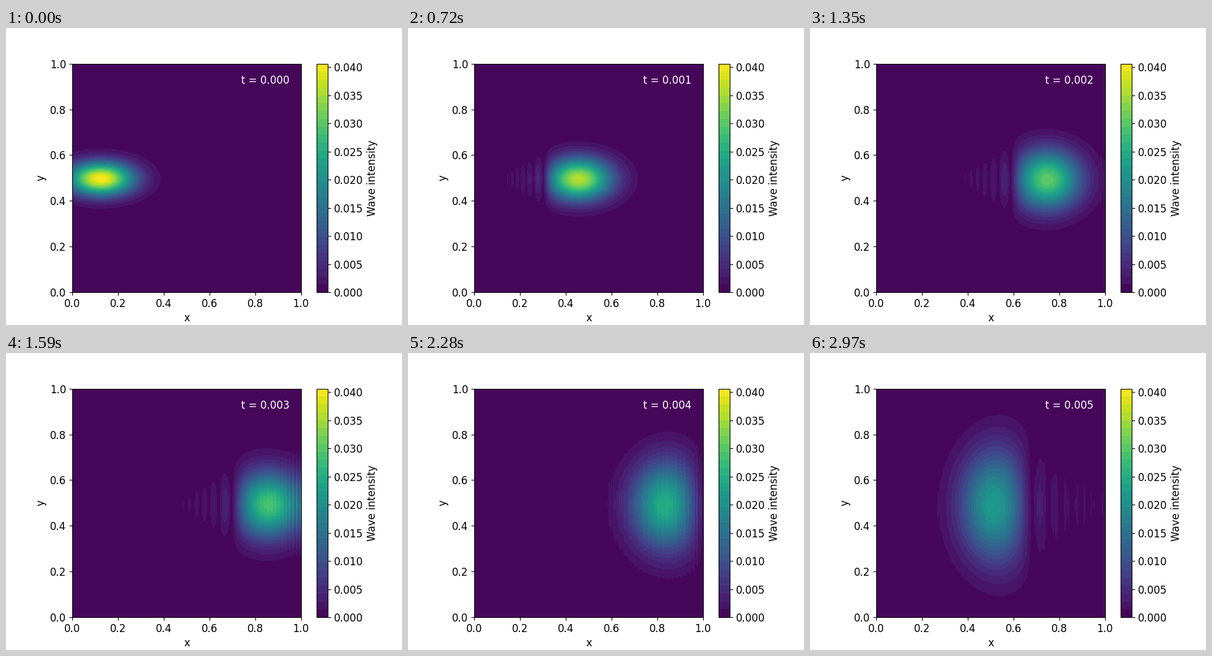
These frames come from a looping animation (640x480 px, 3 s). A matplotlib script:

```python
import numpy as np
import matplotlib.pyplot as plt
from matplotlib.animation import FuncAnimation

plt.rcParams.update({"font.family": "DejaVu Sans", "font.size": 12})

FRAMES = 100
INTERVAL = 30          # ms
FRAME_DT = 5e-5        # simulated time per frame
STEPS = 2              # Crank-Nicolson steps per frame

# Grid and initial wave packet
n = 201
x = np.linspace(0, 1, n)
dx = x[1] - x[0]
X, Y = np.meshgrid(x, x)
X0, Y0 = 0.125, 0.497
SX, SY = 0.1, 0.05
KX, KY = 200, -1

psi0 = np.exp(-0.5 * ((X - X0) / SX) ** 2 - 0.5 * ((Y - Y0) / SY) ** 2
              + 1j * (KX * X + KY * Y))
psi0 /= np.sqrt(np.sum(np.abs(psi0) ** 2))

# Sine modes diagonalise the lattice Laplacian between hard walls
m = np.arange(1, n + 1)
modes = np.sin(np.pi * np.outer(m, m) / (n + 1)) * np.sqrt(2 / (n + 1))
lam = (FRAME_DT / STEPS / dx**2) * (1 - np.cos(np.pi * m / (n + 1)))
phase = 2 * STEPS * np.arctan(lam[:, None] + lam[None, :])
coef = modes @ psi0 @ modes

top = np.abs(psi0).max()
levels = np.linspace(0, top, 30)


def amplitude(i):
    psi = modes @ (coef * np.exp(-1j * phase * i)) @ modes
    return np.minimum(np.abs(psi), top * 0.9999)


fig, ax = plt.subplots(figsize=(6.4, 4.8), dpi=100)
ax.set_aspect("equal")
ax.set_xlabel("x")
ax.set_ylabel("y")


def draw_field(i):
    return ax.contourf(x, x, amplitude(i), levels=levels, cmap="viridis")


bar = fig.colorbar(draw_field(0), ax=ax, ticks=np.arange(0, 0.0401, 0.005))
bar.set_label("Wave intensity")
label = ax.text(0.95, 0.95, "", color="white", ha="right", va="top",
                transform=ax.transAxes)


def update(i):
    for c in list(ax.collections):
        c.remove()
    field = draw_field(i)
    label.set_text(f"t = {i * FRAME_DT:.3f}")
    return field, label


anim = FuncAnimation(fig, update, frames=FRAMES, interval=INTERVAL,
                     repeat=True, repeat_delay=0, blit=False)
plt.show()
```
